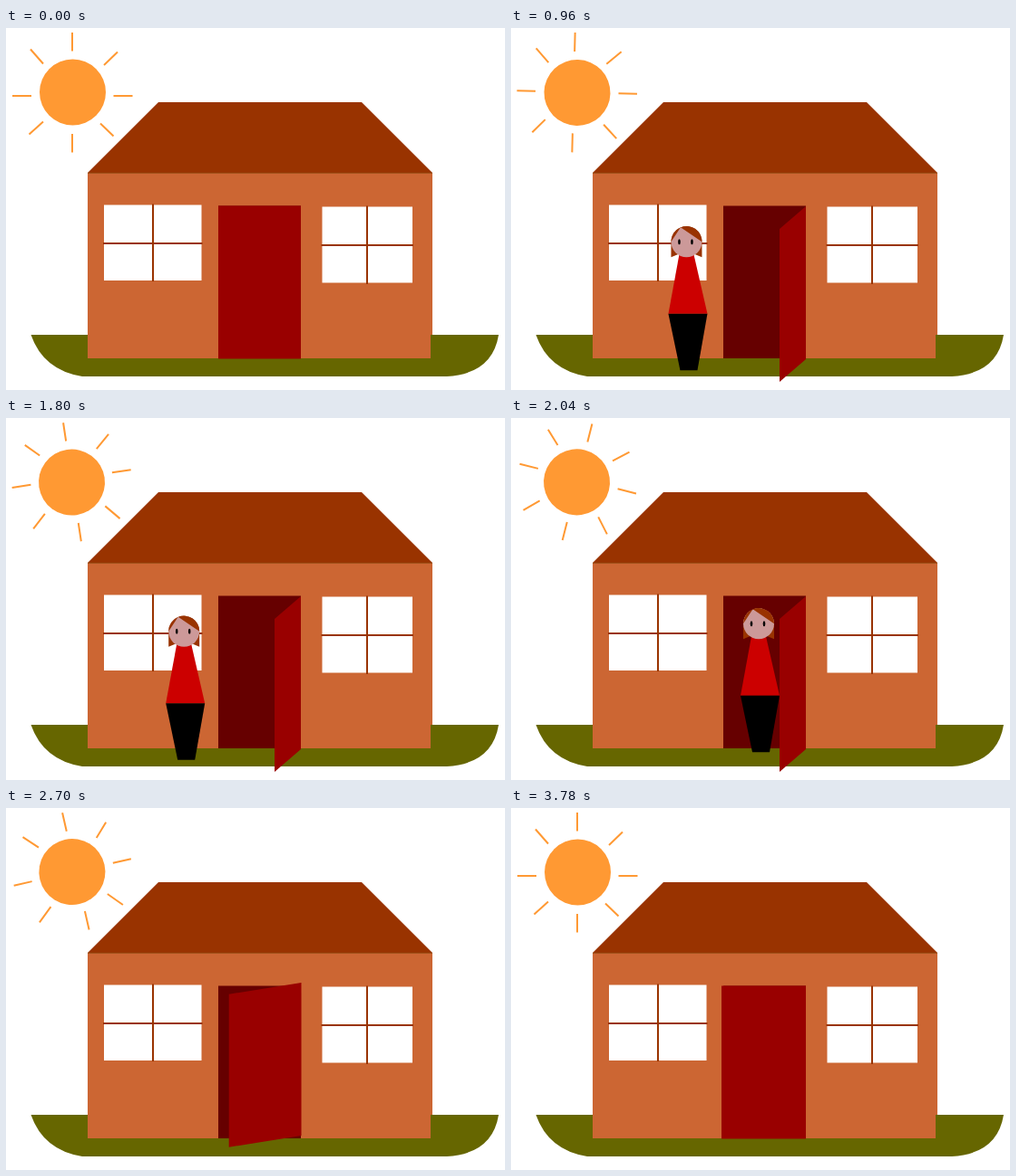
Write an HTML page that moves like this. It is 550x400 px and loops after 3.84 s.

```html
<!DOCTYPE html>
<html lang="en">
<head>
<meta charset="utf-8">
<title>House</title>
<style>
  html, body { margin: 0; width: 100%; height: 100%; overflow: hidden; background: #fff; }
  svg { display: block; }
</style>
</head>
<body>
<svg width="550" height="400" viewBox="0 0 550 400">
  <g id="sun" fill="#f93" stroke="#f93">
    <circle cx="73.5" cy="71" r="36.5" stroke="none"/>
    <path stroke-width="2" d="M73 5V25.5M123 26.5L108 41M118.500 75H139.500M104 105.500L118.500 119.500M73 117V137.500M41 103.500L25.500 117.500M7 75H28M27 23.500L41 39.500"/>
  </g>
  <path fill="#660" d="M27.500 339H543Q536 382 486 385H84Q41 378 27.500 339Z"/>
  <path fill="#c63" d="M90 160H470V339H468V365H90Z"/>
  <path fill="#930" d="M168 82H392L470 160H90Z"/>
  <path stroke="#8a4a10" stroke-width=".8" d="M90 160.300H470"/>
  <path fill="#fff" d="M108 195.500H215.500V279H108ZM348.500 197.500H448V281.500H348.500Z"/>
  <path stroke="#930" stroke-width="2" d="M162 194.500V280M107 238H216.500M398 196.500V283M347.500 240H449"/>
  <path fill="#600" d="M234 196.500H325V365H234Z"/>
  <path id="door" fill="#900"/>
  <g id="person">
    <path fill="#c00" d="M169 252H185L200 317.500H157Z"/>
    <path d="M157 317.500H200L189 380H170Z"/>
    <path fill="#930" d="M160 255V238A17 17 0 0 1 194 238V255L182 250H172Z"/>
    <circle fill="#c99" cx="177" cy="238" r="17"/>
    <path fill="#930" d="M170.500 222A17 17 0 0 1 194 238ZM170.500 222A17 17 0 0 0 160 238Z"/>
    <ellipse cx="169" cy="238" rx="1.300" ry="3"/>
    <ellipse cx="183" cy="238" rx="1.300" ry="3"/>
  </g>
</svg>
<script>
const STEP = 60, STEPS = 64;
const [sun, door, person] = ['sun', 'door', 'person'].map(id => document.getElementById(id));
const progress = (n, from, to) => Math.min(1, Math.max(0, (n - from) / (to - from)));
const mix = (a, b, k) => a + (b - a) * k;

// Centre, width and skew of the leaf are tweened separately.
function drawDoor(open, closedWidth) {
  const cx = mix(325 - closedWidth / 2, 310.5, open);
  const cy = mix(281, 294, open);
  const width = mix(closedWidth, 38.3, open);
  const skew = mix(0, 40.8, open) * Math.PI / 180;
  const dx = width / 2 * Math.cos(skew), dy = width / 2 * Math.sin(skew);
  door.setAttribute('d', `M${cx - dx} ${cy - 84.5 + dy}L${cx + dx} ${cy - 84.5 - dy}v169L${cx - dx} ${cy + 84.5 + dy}Z`);
}

function draw(now) {
  const n = Math.floor(now / STEP) % STEPS;
  sun.setAttribute('transform', `rotate(${n * 360 / (STEPS - 1)} 73 71)`);

  if (n < 38) drawDoor(progress(n, 0, 9), 91);
  else drawDoor(1 - progress(n, 38, 47), 93);

  const inside = 1 - progress(n, 10, 17) + progress(n, 29, 35);
  person.setAttribute('transform', `translate(${115.2 * inside} ${-12.8 * inside})`);
  person.setAttribute('visibility', n >= 10 && n <= 35 ? 'visible' : 'hidden');
  requestAnimationFrame(draw);
}
requestAnimationFrame(draw);
</script>
</body>
</html>
```
